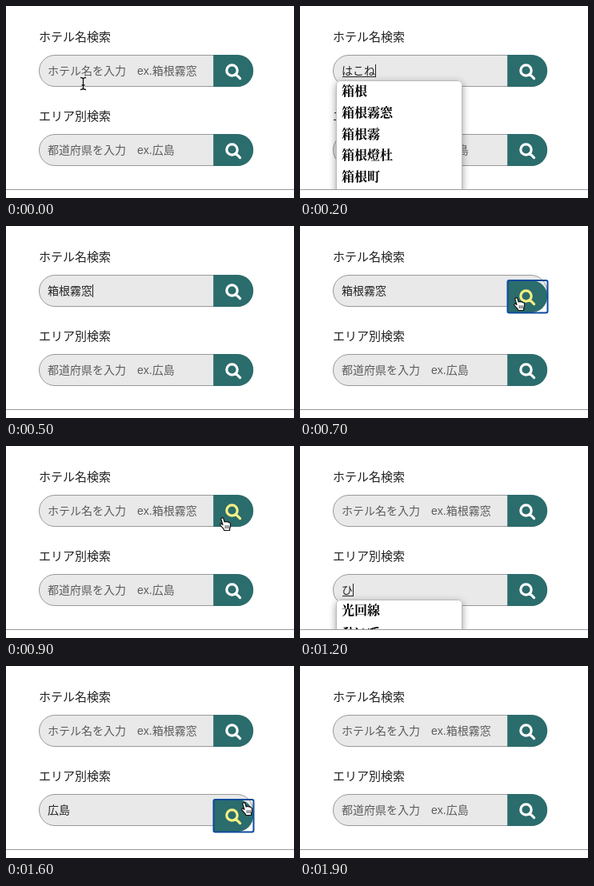
Recreate the animation shown at these times as an HTML page with a canvas. Size 360 px wide and 240 px high, loop 2000 ms.

```html
<!DOCTYPE html>
<html lang="ja">
<head>
<meta charset="utf-8">
<title>ホテル検索</title>
<style>
html, body { margin: 0; width: 100%; height: 100%; overflow: hidden; background: #fff; }
canvas { display: block; width: 360px; height: 240px; }
</style>
</head>
<body>
<canvas id="stage"></canvas>
<script>
const canvas = document.getElementById('stage');
const ctx = canvas.getContext('2d');
const ratio = window.devicePixelRatio || 1;
canvas.width = 360 * ratio;
canvas.height = 240 * ratio;

const SANS = '"Liberation Sans", "Noto Sans CJK JP", "Noto Sans CJK", sans-serif';
const SERIF = '"Noto Serif CJK JP", "Noto Sans CJK JP", "Noto Sans CJK", serif';
const TEAL = '#2b6c6c', YELLOW = '#f5f183';
const STEP = 100, LOOP = 2000;

const FIELDS = [
  { y: 61, label: 'ホテル名検索', hint: 'ホテル名を入力　ex.箱根霧窓' },
  { y: 160, label: 'エリア別検索', hint: '都道府県を入力　ex.広島' }
];
const hakone = ['箱根', '箱根霧窓', '箱根霧', '箱根燈杜', '箱根町'];
const hikari = ['光回線', 'ひいて'];

// One state per step; "field" says which search box is in use.
const hotel = { field: 0, text: '箱根霧窓' };
const area = { field: 1, text: '広島' };
const STATES = [
  { beam: [96, 97] },
  { field: 0, text: 'は', composing: true, caret: true, list: hakone },
  { field: 0, text: 'はこね', composing: true, caret: true, list: hakone },
  { ...hotel, composing: true, caret: true, list: hakone },
  { ...hotel, composing: true, caret: true },
  { ...hotel, caret: true },
  { ...hotel, hover: true, hand: [267, 89] },
  { ...hotel, hover: true, ring: true, pressed: true, hand: [267, 89] },
  { ...hotel, hover: true, ring: true, hand: [267, 89] },
  { field: 0, hover: true, hand: [267, 89] },
  { beam: [190, 176] },
  { beam: [96, 196] },
  { field: 1, text: 'ひ', composing: true, caret: true, list: hikari },
  { field: 1, text: 'ひろしま', composing: true, caret: true, list: ['広島', '広島県'] },
  { ...area, caret: true },
  { ...area, hover: true, hand: [294, 170] },
  { ...area, hover: true, ring: true, pressed: true, hand: [294, 170] },
  { ...area, ring: true, hand: [329, 170] },
  {},
  {}
];

function text(str, x, y, font, color) {
  ctx.font = font;
  ctx.fillStyle = color;
  ctx.fillText(str, x, y);
}

function roundRect(x, y, w, h, radius) {
  ctx.beginPath();
  ctx.roundRect(x, y, w, h, radius);
}

function drawButton(y, state) {
  roundRect(259.2, y, 50, 40, [0, 20, 20, 0]);
  ctx.fillStyle = TEAL;
  ctx.fill();

  ctx.strokeStyle = state.hover ? YELLOW : '#fff';
  ctx.lineWidth = 3.2;
  ctx.lineCap = 'round';
  ctx.beginPath();
  ctx.arc(282.5, y + 19.5, 6.7, 0, Math.PI * 2);
  ctx.moveTo(287.6, y + 24.6);
  ctx.lineTo(292.6, y + 29.6);
  ctx.stroke();

  if (state.ring) {
    roundRect(259.5, y, 50, 40.5, 2);
    ctx.strokeStyle = '#0b4a9c';
    ctx.lineWidth = 2;
    ctx.stroke();
  }
}

function drawField({ y, label, hint }, state) {
  text(label, 41, y - 17, '500 15px ' + SANS, '#222');
  roundRect(41.5, y + 0.5, 267, 39, 19.5);
  ctx.fillStyle = '#e9e9e9';
  ctx.fill();
  ctx.strokeStyle = '#999';
  ctx.lineWidth = 1;
  ctx.stroke();

  const typed = state.text;
  text(typed || hint, 52, y + 25, '14px ' + SANS, typed ? '#222' : '#5c5c5c');
  const end = 52 + ctx.measureText(typed || '').width;
  ctx.fillStyle = '#222';
  if (state.composing) ctx.fillRect(53, y + 27, end - 53, 1);
  if (state.caret) ctx.fillRect(end, y + 12, 1, 16);
  drawButton(y + (state.pressed ? 7 : 0), state);
}

function drawList(items, y) {
  ctx.save();
  ctx.shadowColor = 'rgba(0,0,0,.4)';
  ctx.shadowBlur = 10 * ratio;
  ctx.shadowOffsetY = 3 * ratio;
  roundRect(45, y, 158, 180, 5);
  ctx.fillStyle = '#fff';
  ctx.fill();
  ctx.restore();
  roundRect(45.5, y + 0.5, 157, 180, 5);
  ctx.strokeStyle = '#bbb';
  ctx.lineWidth = 1;
  ctx.stroke();
  items.forEach((item, i) =>
    text(item, 52, y + 19 + i * 26.8, '900 16px ' + SERIF, '#000'));
}

function drawBeam([x, y]) {
  const path = new Path2D('M-3.5-7.5Q0-7.5 0-5.5Q0-7.5 3.5-7.5M0-5.5V5.5M-3.5 7.5Q0 7.5 0 5.5Q0 7.5 3.5 7.5M-2 2H2');
  ctx.save();
  ctx.translate(x + 0.5, y);
  ctx.lineCap = 'butt';
  for (const [color, width] of [['#fff', 3], ['#111', 1.4]]) {
    ctx.strokeStyle = color;
    ctx.lineWidth = width;
    ctx.stroke(path);
  }
  ctx.restore();
}

function drawHand([x, y]) {
  const shape = new Path2D('M2 1.5Q3.5-.3 4.8 1.6L6.2 6Q7.8 4.8 8.7 6Q10.4 5.2 11.1 6.6Q13.2 6.2 13.5 8.5Q14 12 12.6 14.2V16.5H5.8Q5 14 2.8 12.2L.6 9.6Q.6 7.8 2.4 8.2L4 9.4L2 3Q1.6 2 2 1.5Z');
  const creases = new Path2D('M7.2 10.5V13.8M9.2 10.5V13.8M11.2 10.5V13.8');
  ctx.save();
  ctx.translate(x, y);
  ctx.lineJoin = 'round';
  ctx.fillStyle = '#fff';
  ctx.strokeStyle = '#111';
  ctx.lineWidth = 1.2;
  ctx.fill(shape);
  ctx.stroke(shape);
  ctx.lineWidth = 0.8;
  ctx.stroke(creases);
  ctx.restore();
}

function draw(state) {
  ctx.setTransform(ratio, 0, 0, ratio, 0, 0);
  ctx.fillStyle = '#fff';
  ctx.fillRect(0, 0, 360, 240);

  ctx.save();
  ctx.beginPath();
  ctx.rect(0, 0, 360, 230);
  ctx.clip();
  FIELDS.forEach((field, i) => drawField(field, state.field === i ? state : {}));
  if (state.list) drawList(state.list, FIELDS[state.field].y + 32);
  if (state.beam) drawBeam(state.beam);
  if (state.hand) drawHand(state.hand);
  ctx.restore();

  ctx.fillStyle = '#999';
  ctx.fillRect(0, 229, 360, 1);
}

const start = performance.now();
function tick() {
  const time = (performance.now() - start) % LOOP;
  draw(STATES[Math.floor(time / STEP)]);
  requestAnimationFrame(tick);
}
tick();
</script>
</body>
</html>
```
